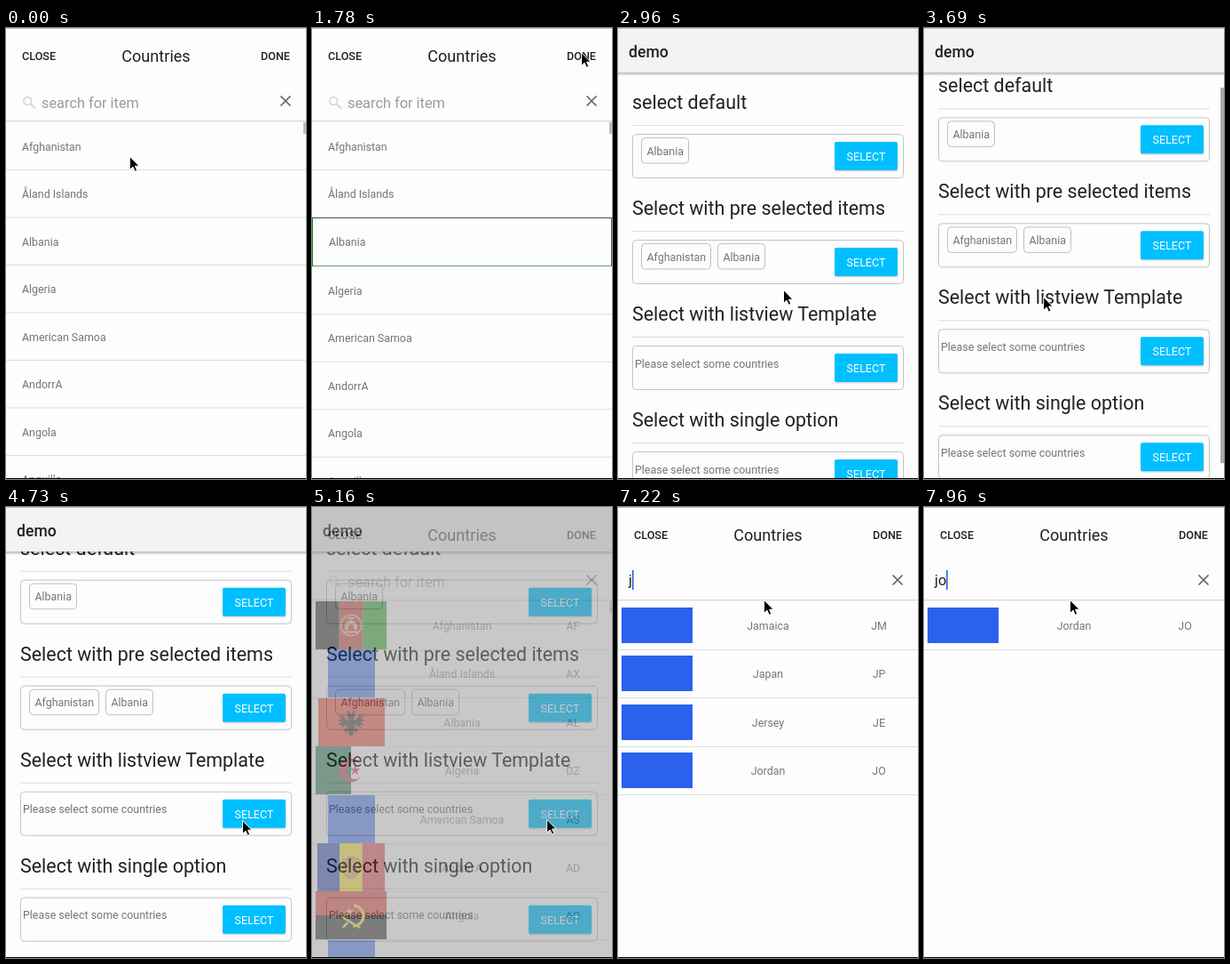
An HTML page for the animation above (8000 ms loop, 338 by 507 pixels).

```html
<!DOCTYPE html>
<html lang="en">
<head>
<meta charset="utf-8">
<title>Country picker</title>
<style>
  html, body { margin: 0; height: 100%; overflow: hidden; background: #fdfdfd; }
  svg { display: block; width: 100vw; height: 100vh; font-family: Roboto, sans-serif; }
</style>
</head>
<body>
<svg id="stage" viewBox="0 0 338 507"></svg>
<script>
const LOOP = 8000, STEP = 146.6;
const GREY = '#757575', INK = '#212121', BLUE = '#2a62ee';

const text = (x, y, size, fill, label, extra = '') =>
  `<text x="${x}" y="${y}" font-size="${size}" fill="${fill}" ${extra}>${label}</text>`;
const rect = (x, y, w, h, fill, extra = '') =>
  `<rect x="${x}" y="${y}" width="${w}" height="${h}" fill="${fill}" ${extra}/>`;
const path = (d, fill, stroke = 'none', width = 1) =>
  `<path d="${d}" fill="${fill}" stroke="${stroke}" stroke-width="${width}"/>`;
const group = (id, content, extra = '') => `<g id="${id}" ${extra}>${content}</g>`;
const middle = 'text-anchor="middle"', medium = 'font-weight="500"';

function star(cx, cy, r, fill) {
  const points = Array.from({ length: 10 }, (_, i) => {
    const a = i * Math.PI / 5 - Math.PI / 2, k = i % 2 ? r * 0.4 : r;
    return `${(cx + k * Math.cos(a)).toFixed(1)},${(cy + k * Math.sin(a)).toFixed(1)}`;
  });
  return `<polygon points="${points.join(' ')}" fill="${fill}"/>`;
}

// Flags are drawn around their own centre.
const bands = (w, colors) => colors.map((c, i) =>
  rect(-w / 2 + i * w / colors.length, -27, w / colors.length, 54, c)).join('');
const wing = path('M0-8L-2-13L-6-12L-3-10L-5-7L-3-5V-2L-7-4L-11-11L-10-6L-15-8L-11-3L-16-3L-11 0L-15 3L-10 3L-12 7' +
  'L-7 4L-4 3L-5 7L-9 8L-6 10L-7 13L-3 9L-3 13L0 16Z', '#140c0a');
const flags = {
  AF: bands(80, ['#000', '#c01f0d', '#090']) +
    '<circle r="11.5" fill="none" stroke="#f0d0c8" stroke-width="1.8" stroke-dasharray="2 1"/>' +
    path('M-7 5V0Q-6-4 0-6Q6-4 7 0V5Z', '#e0a89e') + path('M-3 5V1Q0-3 3 1V5Z', '#c01f0d') +
    path('M-8 7.5H8M-4-8H4', 'none', '#f0d0c8', 1.4),
  AL: rect(-37, -27, 75, 54, '#ee2f17') + wing + `<g transform="scale(-1 1)">${wing}</g>`,
  DZ: bands(80, ['#006233', '#fefefe']) +
    path('M10.6-7.5A13 13 0 1 0 10.6 7.5A10 10 0 1 1 10.6-7.5Z', '#d21034') + star(4.5, 0, 6, '#d21034'),
  AD: bands(76, ['#0a2ba8', '#fedd00', '#d92a38']) +
    path('M-9-9H9V4Q8 10 0 12Q-8 10-9 4Z', '#d2a650', '#bd8c38', 2) +
    path('M-7-7H-1V1H-7ZM1 2H7V5Q5 8 1 9Z', '#cd7a40') + path('M-6-10Q0-16 6-10Z', '#c58a35'),
  AO: rect(-40, -27, 80, 27, '#d6231c') + rect(-40, 0, 80, 27, '#050505') +
    path('M3-11A11.5 11.5 0 0 1 2 12', 'none', '#f9d616', 3) +
    path('M-10 2Q0 8 10 14', 'none', '#f9d616', 2.6) + path('M-9 14L-4 8', 'none', '#f9d616', 2.6) +
    star(-2, -4, 5, '#f9d616')
};
const placeholder = rect(-26, -27, 53, 54, BLUE);
const widePlaceholder = rect(-40, -20, 80, 40, BLUE);

const countries = [['Afghanistan', 'AF'], ['Åland Islands', 'AX'], ['Albania', 'AL'], ['Algeria', 'DZ'],
  ['American Samoa', 'AS'], ['AndorrA', 'AD'], ['Angola', 'AO'], ['Anguilla', 'AI']];
const matches = [['Jamaica', 'JM'], ['Japan', 'JP'], ['Jersey', 'JE'], ['Jordan', 'JO']];

const divider = y => rect(0, y, 338, 1, '#dedede');
const plainRow = ([name], i) =>
  text(18, 137.5 + i * 53.5, 12.4, GREY, name) + divider(159 + i * 53.5);
const flagRow = picture => ([name, code], i) => {
  const y = 133 + Math.round(i * 54.4);
  return `<g transform="translate(44 ${y})">${picture(code)}</g>` +
    text(169, y + 4.5, 12.4, GREY, name, middle) + text(294, y + 4.5, 12.4, GREY, code, middle) + divider(y + 27);
};

const modal = (id, rows) => group(id,
  rect(0, 0, 338, 507, '#fdfdfd') + rows +
  rect(0, 0, 338, 104, '#fdfdfd') + rect(0, 104, 338, 1, '#d8d8d8') + rect(0, 105, 338, 1, '#f0f0f0') +
  text(18, 36, 12.6, INK, 'CLOSE', medium) + text(169, 38, 18.1, INK, 'Countries', middle) +
  text(320, 36, 12.6, INK, 'DONE', medium + ' text-anchor="end"') +
  path('M309.5 76.5L320.5 87.5M320.5 76.5L309.5 87.5', 'none', '#606060', 1.6) +
  group(id + 'Hint',
    '<circle cx="24.3" cy="82" r="4.3" fill="none" stroke="#d8d8d8" stroke-width="1.7"/>' +
    path('M27.5 85.3L33 90.8', 'none', '#d8d8d8', 2) +
    text(40, 89.5, 16.35, '#9b9b9b', 'search for item') + rect(335, 106, 3, 13, '#bcbcbc')) +
  text(12, 88, 16.35, INK, '', `id="${id}Query"`) +
  rect(11.5, 71, 1.6, 22, '#2962e0', `id="${id}Caret"`));

const plainRows =
  countries.slice(0, 2).map(plainRow).join('') +
  group('albania', plainRow(countries[2], 2)) +
  group('below', countries.slice(3).map((c, i) => plainRow(c, i + 3)).join('')) +
  group('frame', rect(0, 213, 338, 1, '#555') + rect(337, 213, 1, 55, '#555') +
    rect(0, 267, 338, 1, '#6b9680') + rect(0, 213, 1, 55, '#008a1c'));
const flagRows =
  group('all', countries.map(flagRow(code => flags[code] || placeholder)).join('')) +
  group('typedJ', matches.map(flagRow(() => widePlaceholder)).join('')) +
  group('typedJo', flagRow(() => widePlaceholder)(matches[3], 0));

const tag = (x, w, y, name) =>
  rect(x + .5, y + 123.5, w, 28.5, 'none', 'rx="4" stroke="#c0c0c0"') + text(x + 6.5, y + 142.5, 12.4, GREY, name);
const section = (title, content, i) => {
  const y = i * 119;
  return text(16, y + 91, 21.45, INK, title) + rect(16, y + 109, 306, 1, '#dedede') +
    rect(16.5, y + 119.5, 305, 49, 'none', 'rx="4" stroke="#c4c4c4"') + content(y) +
    rect(244, y + 129.5, 71.5, 32, '#000', 'rx="2" opacity=".13"') +
    rect(244, y + 128, 71, 32, '#00bfff', 'rx="2"') +
    text(279.5, y + 149, 12.5, '#fff', 'SELECT', middle);
};
const empty = y => text(19, y + 143.5, 12.45, GREY, 'Please select some countries');
const sections = [
  ['select default', y => tag(26, 53, y, 'Albania')],
  ['Select with pre selected items', y => tag(26, 78, y, 'Afghanistan') + tag(112, 53, y, 'Albania')],
  ['Select with listview Template', empty],
  ['Select with single option', empty]
];

stage.innerHTML =
  '<defs><linearGradient id="shade" x2="0" y2="1"><stop stop-opacity=".28"/><stop offset="1" stop-opacity="0"/></linearGradient></defs>' +
  rect(0, 0, 338, 507, '#fdfdfd') +
  group('page', sections.map((s, i) => section(...s, i)).join('') +
    rect(244, 366, 71, 32, '#fff', 'id="press" rx="2"')) +
  rect(334, 50, 4, 422, '#a8a8a8', 'id="thumb"') +
  rect(0, 50, 338, 4, 'url(#shade)') + rect(0, 0, 338, 50, '#f3f3f3') +
  text(12, 32.5, 17.6, INK, 'demo', medium) +
  rect(0, 0, 338, 507, '#000', 'id="dim"') +
  modal('plain', plainRows) + modal('flagged', flagRows) +
  rect(0, 0, 338, 1, '#c2c2c2') + rect(0, 506, 338, 1, '#000') +
  group('cursor', path('M.5.5V15.5L4 12.2L6.3 17.3L8.8 16.2L6.5 11.2H11Z', '#000', '#fff', 1));

// Keys are [step, value...]; values ease between neighbouring keys.
function track(keys, n) {
  const i = keys.findIndex(k => k[0] > n);
  if (i < 0) return keys[keys.length - 1].slice(1);
  if (i === 0) return keys[0].slice(1);
  const a = keys[i - 1], b = keys[i], u = (n - a[0]) / (b[0] - a[0]), e = u * u * (3 - 2 * u);
  return a.slice(1).map((v, j) => v + (b[j + 1] - v) * e);
}
const cursorKeys = [[0, 139, 144], [3, 134, 214], [6, 134, 214], [12, 303, 27], [13, 301, 46], [20, 186, 294],
  [23, 150, 330], [28, 105, 250], [32, 266, 352], [34, 266, 352], [40, 241, 335], [41, 241, 335], [45, 164, 104]];
const scrollKeys = [[23, 0], [27, 37.3]];
const thumbKeys = [[22, 0], [24, 1], [28, 1], [31, 0]];
const dimKeys = [[13, .41], [14, .12], [15, 0], [34, 0], [35, .3], [36, .6]];
const plainKeys = [[12, 1], [13, .23], [14, 0]];
const flaggedKeys = [[34, 0], [35, .3], [36, .85], [37, 1]];

const el = id => document.getElementById(id);
const move = (id, x, y) => el(id).setAttribute('transform', `translate(${x} ${y})`);
const fade = (id, value) => el(id).setAttribute('opacity', value);
const show = (id, on) => el(id).style.display = on ? '' : 'none';

function draw(n) {
  move('cursor', ...track(cursorKeys, n));
  const [scroll] = track(scrollKeys, n);
  move('page', 0, -scroll);
  move('thumb', 0, scroll * .92);
  fade('thumb', track(thumbKeys, n));
  fade('dim', track(dimKeys, n));
  fade('plain', track(plainKeys, n));
  fade('flagged', track(flaggedKeys, n));
  fade('press', n === 34 ? .25 : 0);

  const selected = n >= 5;
  show('frame', selected);
  move('albania', selected ? 1 : 0, selected ? .8 : 0);
  move('below', 0, selected ? 1.8 : 0);
  show('plainCaret', (n >= 2 && n < 5) || (n >= 9 && n < 12));

  const query = n >= 50 ? 'jo' : n >= 47 ? 'j' : '';
  el('flaggedQuery').textContent = query;
  show('flaggedHint', !query);
  show('all', !query);
  show('typedJ', query === 'j');
  show('typedJo', query === 'jo');
  show('flaggedCaret', query || (n >= 41 && n < 45));
  move('flaggedCaret', [0, 4.5, 13.6][query.length], 0);
}

function tick(now) {
  draw(Math.floor(now % LOOP / STEP));
  requestAnimationFrame(tick);
}
tick(performance.now());
</script>
</body>
</html>
```
